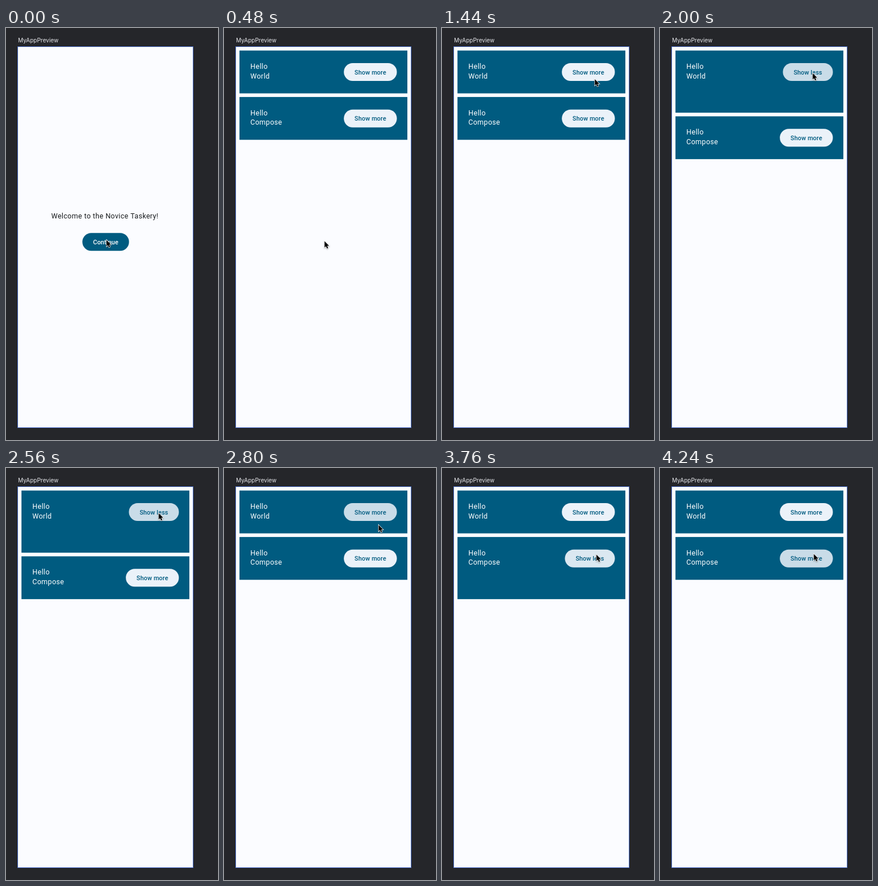
Animation, 370 px wide and 716 px high, one loop 4320 ms. Source, as an HTML page with a canvas:

```html
<!DOCTYPE html>
<html lang="en">
<head>
<meta charset="utf-8">
<title>App preview</title>
<style>
  html, body { margin: 0; width: 100%; height: 100%; overflow: hidden; background: #25262a; }
  canvas { display: block; }
</style>
</head>
<body>
<canvas id="stage" width="370" height="716"></canvas>
<script>
const ctx = document.getElementById('stage').getContext('2d');
const LOOP = 4320, STEP = 80;
const PRIMARY = '#005b80', SURFACE = '#fbfcff', RAISED = '#ebf2f9';
const BODY = '12.37px Roboto, sans-serif';
const LABEL = '500 10.8px Roboto, sans-serif';

// Each press: ripple start, click time, pointer position
const presses = {
  start: [{ down: 40, click: 400, x: 176, y: 370 }],
  first: [{ down: 1600, click: 1920, x: 266, y: 78 }, { down: 2400, click: 2720, x: 266, y: 80 }],
  second: [{ down: 3280, click: 3600, x: 269, y: 150 }, { down: 3840, click: 4160, x: 268, y: 149 }]
};

// Pointer stops: time, x, y
const pointerPath = [
  [0, 175, 368], [320, 175, 370], [740, 175, 370], [1480, 267, 86], [1600, 266, 78],
  [2640, 266, 78], [2860, 270, 103], [3240, 269, 150], [3760, 269, 150], [4000, 268, 149], [LOOP, 268, 149]
];

const clamp = v => Math.max(0, Math.min(1, v));
const smooth = v => v * v * (3 - 2 * v);

function text(str, x, y, font, color, spacing = 0) {
  ctx.font = font;
  ctx.letterSpacing = spacing + 'px';
  ctx.fillStyle = color;
  ctx.fillText(str, x, y);
}

function ripple(press, t, color, strength) {
  const age = t - press.down;
  const fade = 1 - clamp((t - press.click - 80) / 150);
  if (age <= 0 || fade <= 0) return;
  ctx.globalAlpha = strength * clamp(age / 75) * fade;
  ctx.fillStyle = color;
  ctx.beginPath();
  ctx.arc(press.x, press.y, 12 + 70 * smooth(clamp(age / 225)), 0, 7);
  ctx.fill();
  ctx.globalAlpha = 1;
}

function button(label, right, y, fill, ink, strength, list, t) {
  ctx.font = LABEL;
  ctx.letterSpacing = '0.08px';
  const width = ctx.measureText(label).width + 37.4;
  ctx.save();
  ctx.beginPath();
  ctx.roundRect(right - width, y, width, 31, 15.5);
  ctx.fillStyle = fill;
  ctx.fill();
  ctx.clip();
  for (const press of list) ripple(press, t, ink, strength);
  ctx.restore();
  text(label, right - width + 18.7, y + 19.6, LABEL, ink, 0.08);
}

function card(name, y, list, t) {
  const open = t >= list[0].click && t < list[1].click;
  const height = open ? 108 : 74.4;
  ctx.fillStyle = PRIMARY;
  ctx.fillRect(27, y, 293, height);
  text('Hello', 46, y + 31.8, BODY, '#fff', 0.387);
  text(name, 46, y + 48.4, BODY, '#fff', 0.387);
  button(open ? 'Show less' : 'Show more', 301.7, y + 21.8, RAISED, PRIMARY, 0.145, list, t);
  return y + height + 6.3;
}

function pointer(t) {
  const i = pointerPath.findIndex(p => p[0] > t);
  const [a, b] = [pointerPath[i - 1], pointerPath[i]];
  const k = smooth((t - a[0]) / (b[0] - a[0]));
  ctx.save();
  ctx.translate(a[1] + (b[1] - a[1]) * k, a[2] + (b[2] - a[2]) * k);
  const arrow = new Path2D('M.5 .5V11.6L3 9.3L4.8 13.3L6.7 12.5L5 8.6H8.4Z');
  ctx.shadowColor = 'rgba(0,0,0,.35)';
  ctx.shadowBlur = 2;
  ctx.shadowOffsetY = 1;
  ctx.strokeStyle = '#fff';
  ctx.lineWidth = 1.4;
  ctx.stroke(arrow);
  ctx.shadowColor = 'transparent';
  ctx.fillStyle = '#000';
  ctx.fill(arrow);
  ctx.restore();
}

function draw(t) {
  ctx.fillStyle = '#25262a';
  ctx.fillRect(0, 0, 370, 716);
  text('MyAppPreview', 21, 25, '10px Inter, sans-serif', '#e4e5e9');
  ctx.fillStyle = SURFACE;
  ctx.fillRect(20, 32, 307, 663);
  ctx.strokeStyle = '#5578d8';
  ctx.lineWidth = 1;
  ctx.strokeRect(20.5, 32.5, 306, 662);

  if (t < presses.start[0].click) {
    text('Welcome to the Novice Taskery!', 79, 331.4, BODY, '#191c1e', 0.387);
    button('Continue', 214.7, 356.3, PRIMARY, '#fff', 0.16, presses.start, t);
  } else {
    const next = card('World', 39.2, presses.first, t);
    card('Compose', next, presses.second, t);
  }
  pointer(t);
}

function frame() {
  const t = performance.now() % LOOP;
  draw(Math.floor(t / STEP) * STEP);
  requestAnimationFrame(frame);
}
frame();
</script>
</body>
</html>
```
